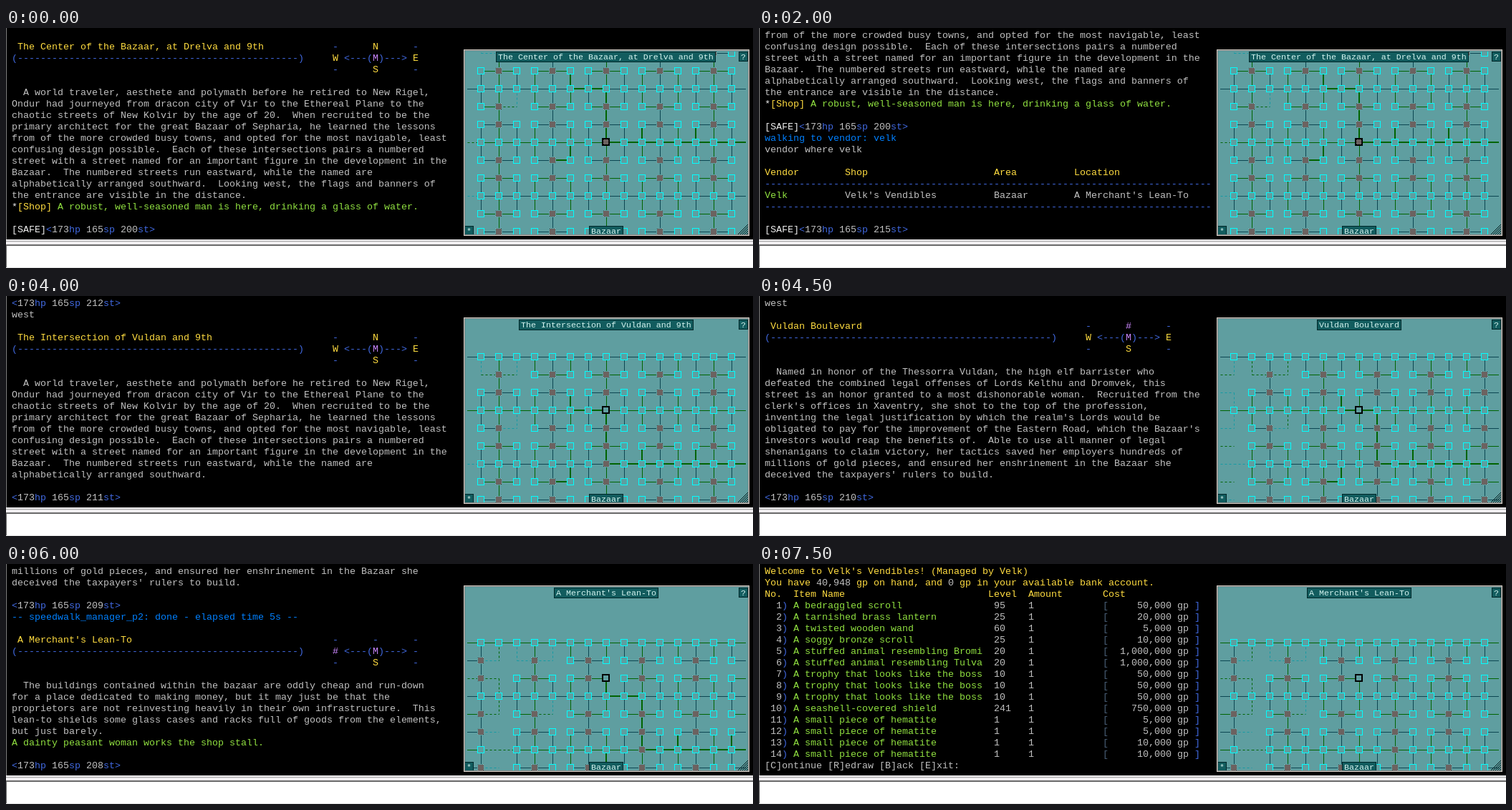
Recreate the animation shown at these times as an HTML page with a canvas. Size 1043 by 336 pixels, loop 9 s.

```html
<!DOCTYPE html>
<html lang="en">
<head>
<meta charset="utf-8">
<title>Bazaar walk</title>
<style>
html, body { margin: 0; width: 100%; height: 100%; overflow: hidden; background: #000; }
canvas { display: block; }
</style>
</head>
<body>
<canvas id="stage" width="1043" height="336"></canvas>
<script>
const LOOP = 9000;
const ROWS = 18;
const CELL = 25;
const HUB = { x: 838, y: 160 };
const FONT = '"Liberation Mono", monospace';
const COLORS = {
  g: '#c0c0c0', w: '#ececec', y: '#ffdc40', b: '#4169e1', v: '#cc88ff',
  l: '#90e040', c: '#0080ff', d: '#4a6078'
};
const ctx = document.getElementById('stage').getContext('2d');

// ---------- Terminal log: ^x switches to colour x ----------

const prompt = (st, safe) =>
  (safe ? '^w[SAFE]' : '') + `^b<^g173^bhp ^g165^bsp ^g${st}^bst>`;
const exit = e => (e === '-' ? '^b' : e === '#' ? '^v' : '^y') + e;

function room(title, [n, w, e, s], text) {
  const gap = ' '.repeat(6);
  const side = mid => `^b-${gap}${exit(mid)}${gap}^b-`;
  return [
    '^y' + (' ' + title).padEnd(56) + side(n),
    '^b(' + '-'.repeat(49) + ')' + ' '.repeat(5) +
      `${exit(w)} ^b<---(^vM^b)---> ${exit(e)}`,
    ' '.repeat(56) + side(s),
    '',
    ...text.split('\n')
  ];
}

const STREETS = `  A world traveler, aesthete and polymath before he retired to New Rigel,
Ondur had journeyed from dracon city of Vir to the Ethereal Plane to the
chaotic streets of New Kolvir by the age of 20.  When recruited to be the
primary architect for the great Bazaar of Sepharia, he learned the lessons
from of the more crowded busy towns, and opted for the most navigable, least
confusing design possible.  Each of these intersections pairs a numbered
street with a street named for an important figure in the development in the
Bazaar.  The numbered streets run eastward, while the named are
alphabetically arranged southward.`;

const CENTER = STREETS + `  Looking west, the flags and banners of
the entrance are visible in the distance.`;

const NUMBERED = `  The bazaar's numbered streets run north to south, providing easy access
to the hundreds of tents and makeshift tents out of which merchants sell
their wares.  Many of the merchants around town engage in a higher form of
mercantilism- selling not just their own goods, but selling their own time
with which to sell other peoples' wares.  Many can be rented as vendors by
Adventurers, so they can focus on adventures while their vendors sell their
goods for them.`;

const BOULEVARD = `  Named in honor of the Thessorra Vuldan, the high elf barrister who
defeated the combined legal offenses of Lords Kelthu and Dromvek, this
street is an honor granted to a most dishonorable woman.  Recruited from the
clerk's offices in Xaventry, she shot to the top of the profession,
inventing the legal justification by which the realm's Lords would be
obligated to pay for the improvement of the Eastern Road, which the Bazaar's
investors would reap the benefits of.  Able to use all manner of legal
shenanigans to claim victory, her tactics saved her employers hundreds of
millions of gold pieces, and ensured her enshrinement in the Bazaar she
deceived the taxpayers' rulers to build.`;

const STALL = `  The buildings contained within the bazaar are oddly cheap and run-down
for a place dedicated to making money, but it may just be that the
proprietors are not reinvesting heavily in their own infrastructure.  This
lean-to shields some glass cases and racks full of goods from the elements,
but just barely.
^lA dainty peasant woman works the shop stall.`;

const ITEMS = [
  ['bedraggled scroll', 95, '50,000'],
  ['tarnished brass lantern', 25, '20,000'],
  ['twisted wooden wand', 60, '5,000'],
  ['soggy bronze scroll', 25, '10,000'],
  ['stuffed animal resembling Bromi', 20, '1,000,000'],
  ['stuffed animal resembling Tulva', 20, '1,000,000'],
  ['trophy that looks like the boss', 10, '50,000'],
  ['trophy that looks like the boss', 10, '50,000'],
  ['trophy that looks like the boss', 10, '50,000'],
  ['seashell-covered shield', 241, '750,000'],
  ['small piece of hematite', 1, '5,000'],
  ['small piece of hematite', 1, '5,000'],
  ['small piece of hematite', 1, '10,000'],
  ['small piece of hematite', 1, '10,000']
];

const wares = [
  "^yWelcome to Velk's Vendibles! (Managed by Velk)",
  '^yYou have ^g40,948^y gp on hand, and ^g0^y gp in your available bank account.',
  '^y' + 'No.  Item Name'.padEnd(39) + 'Level'.padEnd(7) + 'Amount'.padEnd(13) + 'Cost',
  ...ITEMS.map(([name, level, cost], i) =>
    `^g${String(i + 1).padStart(3)}^b) ^l${('A ' + name).padEnd(35)}` +
    `^g${String(level).padEnd(6)}1${' '.repeat(12)}^d[^g${cost.padStart(11)} gp ^b]`),
  '[C]ontinue [R]edraw [B]ack [E]xit:'
];

const vendors = [
  '',
  '^y' + 'Vendor'.padEnd(14) + 'Shop'.padEnd(26) + 'Area'.padEnd(14) + 'Location',
  '^b' + '-'.repeat(78),
  '^l' + 'Velk'.padEnd(14) + "^gVelk's Vendibles".padEnd(28) + 'Bazaar'.padEnd(14) + "A Merchant's Lean-To",
  '^b' + '-'.repeat(78),
  '',
  prompt(215, true)
];

const PLACES = {
  center: 'The Center of the Bazaar, at Drelva and 9th',
  street: '9th Street',
  cross: 'The Intersection of Vuldan and 9th',
  road: 'Vuldan Boulevard',
  stall: "A Merchant's Lean-To"
};

const log = [];
const views = [];
function view(t, lines, place, col, row) {
  log.push(...lines);
  views.push({ t, rows: log.slice(-ROWS), place, col, row });
}
const step = (cmd, place, exits, text, st) =>
  [cmd, '', ...room(place, exits, text), '', prompt(st)];

const { center, street, cross, road, stall } = PLACES;
view(0, ['', ...room(center, 'NWES', CENTER),
  '^w*^y[Shop] ^lA robust, well-seasoned man is here, drinking a glass of water.',
  '', prompt(200, true)], center, 0, 0);
view(1500, ['^cwalking to vendor: velk', 'vendor where velk'], center, 0, 0);
view(2000, vendors, center, 0, 0);
view(3000, ['north', '', prompt(215, true),
  ...step('north', street, 'N##S', NUMBERED, 214)], street, 0, -1);
view(3500, step('north', street, 'N##S', NUMBERED, 212), street, 0, -2);
view(4000, step('west', cross, 'NWES', STREETS, 211), cross, 0, -3);
view(4500, step('west', road, '#WES', BOULEVARD, 210), road, -1, -3);
view(5000, step('north', road, '#WES', BOULEVARD, 209), road, -2, -3);
view(5500, [], road, -2, -3);
views[views.length - 1].rows[0] = 'open north';
view(6000, ['^c-- speedwalk_manager_p2: done - elapsed time 5s --', '',
  ...room(stall, '-#-S', STALL), '', prompt(208)], stall, -2, -4);
view(7400, ['list velk'], stall, -2, -4);
view(7500, wares, stall, -2, -4);

function drawLine(line, x, y) {
  line.split(/\^(\w)/).reduce((color, part, i) => {
    if (i % 2) return COLORS[part];
    ctx.fillStyle = color;
    ctx.fillText(part, x, y);
    x += part.length * 8;
    return color;
  }, COLORS.g);
}

function drawLog(rows) {
  ctx.font = '13.333px ' + FONT;
  rows.forEach((line, i) => drawLine(line, 8, 14 + i * 16));
}

// ---------- Map: shops between streets (columns) and boulevards (rows) ----------

const GREEN = '#006400';
const GROUND = '#5f9ea0';
const NORTH_END = -6;
const MISSING = new Set(['-7,-5', '-5,-5', '-5,-2', '-10,-4']);
const ROUTES = [
  [[8, 0], [0, 0], [0, -3], [-2, -3], [-2, -4]],
  [[2, 0], [2, -1]],
  [[5, 0], [5, -1]],
  [[-2, 0], [-2, 1], [-3, 1]]
];
const main = n => n % 3 === 0;
const exists = (c, r) => r >= NORTH_END && !MISSING.has(c + ',' + r) &&
  (c !== -8 || r === NORTH_END || r === -3);
const hatched = (c, r) => main(c) && (!main(r) || (c === 0 && r === 0));

const tile = document.createElement('canvas');
tile.width = tile.height = 2;
const tctx = tile.getContext('2d');
tctx.fillStyle = '#d8c4c0';
tctx.fillRect(0, 0, 2, 2);
tctx.fillStyle = '#000';
tctx.fillRect(0, 0, 1, 1);
tctx.fillRect(1, 1, 1, 1);
const hatch = ctx.createPattern(tile, 'repeat');

function box(x, y, w, h, fill, edge) {
  ctx.fillStyle = fill;
  ctx.fillRect(x, y, w, h);
  if (!edge) return;
  ctx.strokeStyle = edge;
  ctx.lineWidth = 1;
  ctx.strokeRect(x + .5, y + .5, w - 1, h - 1);
}

function label(text, x, y, h = 14) {
  const w = text.length * 7 + 6;
  box(x, y, w, h, '#125c5e', '#00282a');
  ctx.fillStyle = '#d4f4f0';
  ctx.font = '11.667px ' + FONT;
  ctx.fillText(text, x + 3, y + 11);
}

function link(c, r, dc, dr, px, py, odd) {
  const from = exists(c, r), to = exists(c + dc, r + dr);
  if (!from && !to) return;
  const solid = from && to;
  ctx.setLineDash(solid ? [] : [3, 3]);
  ctx.strokeStyle = !odd ? GREEN : solid ? '#0c4652' : '#149aa4';
  ctx.beginPath();
  ctx.moveTo(px, py);
  ctx.lineTo(px + dc * CELL, py + dr * CELL);
  ctx.stroke();
}

function clipTo(x, y, w, h) {
  ctx.beginPath();
  ctx.rect(x, y, w, h);
  ctx.clip();
}

function drawLinks(col, row, routed) {
  ctx.save();
  clipTo(644, 33, 389, 256);
  ctx.lineWidth = 1;
  for (let i = -9; i <= 8; i++) {
    for (let j = -6; j <= 5; j++) {
      const c = col + i, r = row + j;
      if (r < NORTH_END) continue;
      const px = HUB.x + i * CELL + .5, py = HUB.y + j * CELL + .5;
      if (main(r) || main(c) || main(c + 1)) link(c, r, 1, 0, px, py, j % 2);
      if (main(c) || main(r) || main(r + 1)) link(c, r, 0, 1, px, py, i % 2);
    }
  }
  ctx.setLineDash([]);
  if (routed) {
    ctx.strokeStyle = GREEN;
    ctx.lineWidth = 2;
    for (const route of ROUTES) {
      ctx.beginPath();
      for (const [c, r] of route)
        ctx.lineTo(HUB.x + (c - col) * CELL, HUB.y + (r - row) * CELL);
      ctx.stroke();
    }
  }
  ctx.restore();
}

function drawNodes(col, row) {
  for (let i = -7; i <= 7; i++) {
    for (let j = -5; j <= 5; j++) {
      const c = col + i, r = row + j;
      if (!exists(c, r)) continue;
      const x = HUB.x + i * CELL - 5, y = HUB.y + j * CELL - 5;
      if (hatched(c, r)) box(x, y, 10, 10, hatch, GROUND);
      else box(x, y, 10, 10, GROUND, '#00ffff');
    }
  }
  ctx.strokeStyle = '#000';
  ctx.lineWidth = 2;
  ctx.strokeRect(HUB.x - 5, HUB.y - 5, 9, 9);
}

function drawGrip() {
  ctx.strokeStyle = '#001818';
  ctx.lineWidth = 1;
  for (let d = 2; d <= 14; d += 3) {
    ctx.beginPath();
    ctx.moveTo(1036 - d, 289);
    ctx.lineTo(1036, 289 - d);
    ctx.stroke();
  }
}

function drawMap({ place, col, row }, routed) {
  box(639, 30, 399, 261, '#d4d0c8');
  box(640, 31, 397, 259, '#808080');
  box(641, 32, 395, 257, GROUND);
  ctx.save();
  clipTo(641, 33, 395, 256);
  drawLinks(col, row, routed);
  drawNodes(col, row);
  label(place, Math.floor(HUB.x - (place.length * 7 + 6) / 2), 33, 15);
  label('Bazaar', 814, 277);
  label('?', 1023, 33);
  label('*', 640, 277);
  drawGrip();
  ctx.restore();
}

// ---------- Command field ----------

const TYPED = [
  { t: 500, end: 1500, text: 'vwalk velk' },
  { t: 6500, end: 7400, text: 'list velk' }
];

function drawInput(t) {
  box(0, 296, 1043, 8, '#f0eef0');
  box(0, 298, 1043, 1, '#a0a0a0');
  box(0, 303, 1043, 2, '#696969');
  box(0, 305, 1043, 31, '#fff');
  box(0, 304, 1, 32, '#696969');
  box(0, 335, 1043, 1, '#e3e3e3');
  const entry = TYPED.find(e => t >= e.t && t < e.end);
  if (!entry) return;
  const n = Math.floor((t - entry.t) / 100) + 1;
  ctx.fillStyle = '#000';
  ctx.font = '13.333px ' + FONT;
  ctx.fillText(entry.text.slice(0, n), 2, 319);
  ctx.fillRect(2 + n * 8, 307, 1, 16);
}

function draw(t) {
  const now = views.filter(v => v.t <= t).pop();
  box(0, 0, 1043, 336, '#000');
  box(0, 0, 1, 296, '#808080');
  drawLog(now.rows);
  drawMap(now, t < 7500);
  drawInput(t);
}

const start = performance.now();
function tick() {
  draw((performance.now() - start) % LOOP);
  requestAnimationFrame(tick);
}
tick();
</script>
</body>
</html>
```
